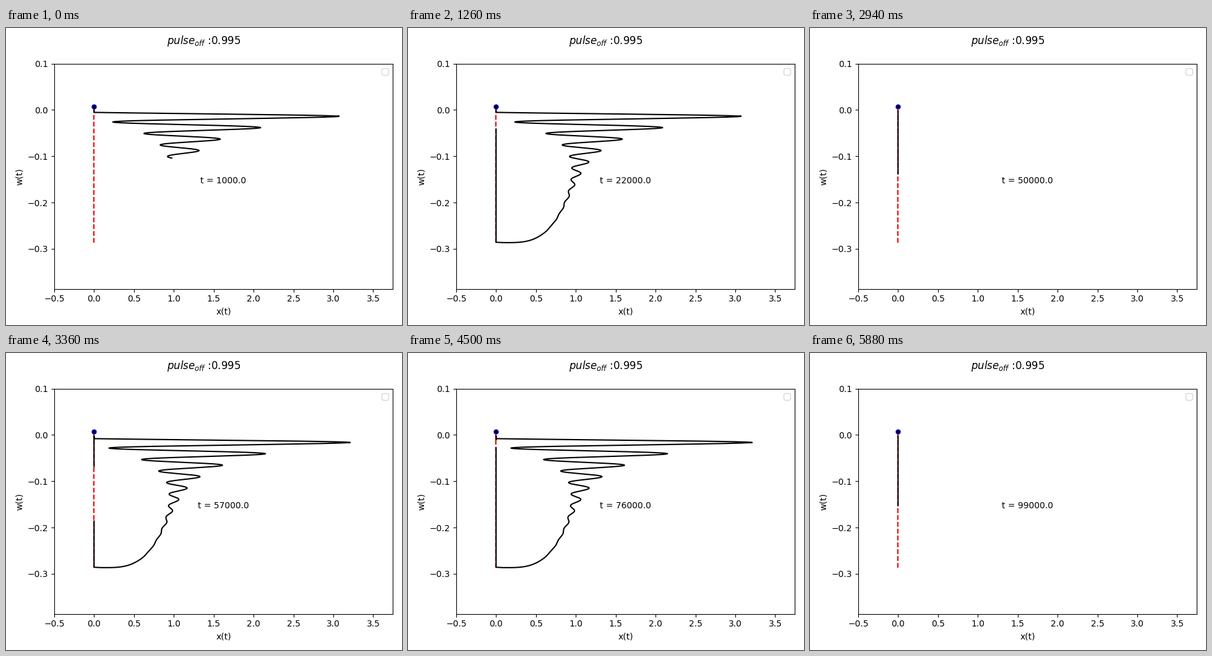
A matplotlib script for the animation above (5.94 s loop, 640 by 480 pixels).

```python
import numpy as np
import matplotlib.pyplot as plt
from matplotlib.animation import FuncAnimation

STEP, WINDOW, FRAMES = 1000, 40000, 99
W_START, FOLD, LANDING = 0.0067, -0.2866, -0.2859
PITCH = 0.0124   # drop in w per half swing
DECAY = 0.717    # damping per half swing


def orbit(w, w_peak, swing, lift):
    """Damped ringing around the slow branch that ends at the fold."""
    k = (w_peak - w) / PITCH
    branch = 0.1 + 1.6 * (w - FOLD) ** 0.3
    return branch + lift * 0.6**k + swing * DECAY**k * np.cos(np.pi * k)


def burst(t0, w_jump, w_peak, swing, lift):
    """One excursion: sharp rise, ringing, slide to the fold, fall to x = 0."""
    u = np.linspace(0, 1, 3000)
    w = FOLD + (w_peak - FOLD) * (1 - u) ** 3
    x = orbit(w, w_peak, swing, lift)
    v = np.linspace(0, 1, 60)[:-1]
    x = np.concatenate([x[0] * (v + v**2 - v**3), x, [0]])
    w = np.concatenate([w_jump + (w_peak - w_jump) * v, w, [LANDING]])

    speed = np.maximum(2 * x + w, 0.2)[1:]
    c = np.concatenate([[0], np.cumsum(np.abs(np.diff(w)) / speed)])
    ref = np.interp(0.104, -w[:-1], c[:-1])
    t = t0 + 1000 + (c - ref) * 1700 / (c[-1] - ref)
    return t, x, w


def recover(t0, t1):
    """Slow exponential return along x = 0."""
    t = np.linspace(t0, t1, 600)[1:]
    return t, 0 * t, LANDING * np.exp(-(t - t0) / 1e4)


first = burst(0, -0.0053, -0.0139, 1.575, 0.33)
second = burst(50000, -0.008, -0.0163, 1.67, 0.37)
parts = [
    (np.array([0]), np.array([0]), np.array([W_START])),
    first,
    recover(first[0][-1], second[0][0] - 300),
    second,
    recover(second[0][-1], FRAMES * STEP),
]
T = np.arange(0, FRAMES * STEP + 1, 2)
tk, xk, wk = (np.concatenate(p) for p in zip(*parts))
X, W = np.interp(T, tk, xk), np.interp(T, tk, wk)

fig, ax = plt.subplots(figsize=(6.4, 4.8), dpi=100)
fig.suptitle(r"$pulse_{off}$ :0.995")
ax.set(xlim=(-0.5, 3.745), ylim=(FOLD - 0.1, 0.1), xlabel="x(t)", ylabel="w(t)")
ax.legend(handles=[], loc="upper right")
fig.tight_layout()
fig.subplots_adjust(top=0.88)

ax.plot([0, 0], [FOLD, W_START], "r--")
trail, = ax.plot([], [], "k")
ax.plot([0], [W_START], "o", mfc="k", mec="b", ms=5, zorder=3)
label = ax.text(0.5, 0.47, "", transform=ax.transAxes, ha="center")


def draw(n):
    now = (n + 1) * STEP
    seen = (T >= now - WINDOW) & (T <= now)
    trail.set_data(X[seen], W[seen])
    label.set_text(f"t = {now:.1f}")
    return trail, label


anim = FuncAnimation(fig, draw, frames=FRAMES, interval=60, repeat=True, repeat_delay=0)
plt.show()
```
